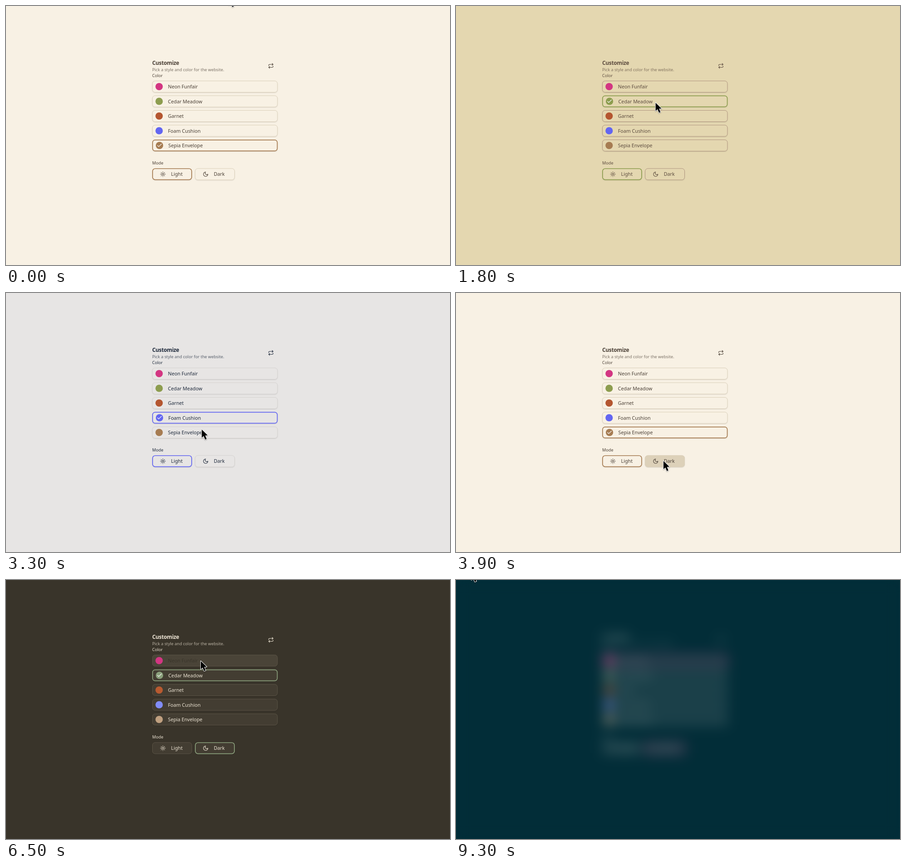
An HTML page with a canvas for the animation above (9.7 s loop, 978 px wide and 572 px high).

```html
<!DOCTYPE html>
<html lang="en">
<head>
<meta charset="utf-8">
<title>Customize</title>
<style>
html, body { margin: 0; width: 100%; height: 100%; overflow: hidden; background: #f8f1e4; }
canvas { display: block; width: 978px; height: 572px; }
</style>
</head>
<body>
<canvas id="stage" width="978" height="572"></canvas>
<script>
const canvas = document.getElementById('stage');
const ctx = canvas.getContext('2d');
const LOOP = 9700, STEP = 100, CLOSE = 7900;
const FONT = '"Noto Sans", "Open Sans", sans-serif';

const rgb = hex => [1, 3, 5].map(i => parseInt(hex.slice(i, i + 2), 16));
const css = c => `rgb(${c.map(Math.round)})`;
const mix = (a, b, k) => a.map((v, i) => v + (b[i] - v) * k);
const luma = c => 0.3 * c[0] + 0.59 * c[1] + 0.11 * c[2];

// A few base colours give the whole palette of a theme
function palette(dark, ...hexes) {
  const [bg, fg, border, accent, primary] = hexes.map(rgb);
  const [deep, pale] = dark ? [bg, fg] : [fg, bg];
  return {
    bg, fg, border, primary,
    muted: mix(fg, bg, 0.28),
    fill: dark ? mix(bg, border, 0.3) : bg,
    over: dark ? mix(bg, border, 0.5) : accent,
    overText: luma(accent) > 128 ? deep : pale
  };
}
const light = (...c) => palette(false, ...c);
const dark = (...c) => palette(true, ...c);

// background, text, border, accent, primary
const THEMES = [
  { name: 'Neon Funfair',
    Light: light('#fdf4e0', '#073642', '#839496', '#c94e20', '#d33682'),
    Dark: dark('#022d38', '#93a1a1', '#586e75', '#cb4b16', '#d33682') },
  { name: 'Cedar Meadow',
    Light: light('#e4d7b0', '#5c4b3e', '#b19681', '#dbc894', '#8d9d4f'),
    Dark: dark('#39342a', '#ede4d4', '#5a5345', '#a18f5c', '#8a9f7b') },
  { name: 'Garnet',
    Light: light('#f4f2ea', '#3d3929', '#d8d5cc', '#e1dac8', '#b45630'),
    Dark: dark('#262624', '#c3c0b6', '#3e3e38', '#1a1915', '#b85a30') },
  { name: 'Foam Cushion',
    Light: light('#e7e5e4', '#1e293b', '#d6d3d1', '#f3e5f5', '#6366f1'),
    Dark: dark('#1e1b18', '#e2e8f0', '#3a3633', '#484441', '#818cf8') },
  { name: 'Sepia Envelope',
    Light: light('#f8f1e4', '#4a3f35', '#dbd0ba', '#d7cbb0', '#a67c52'),
    Dark: dark('#2a2522', '#ece5d8', '#4a4039', '#59493e', '#c0a080') }
];

// Where the pointer arrives and what it clicks there
const stop = (at, x, y, click) => ({ at, x, y, click });
const STOPS = [
  stop(0, 491, -20, 4),
  stop(1000, 442, 178, 0),
  stop(1350, 442, 209),
  stop(1700, 440, 212, 1),
  stop(2100, 434, 244, 2),
  stop(2400, 431, 303),
  stop(2500, 429, 281),
  stop(2700, 428, 276, 3),
  stop(3400, 432, 308, 4),
  stop(3850, 457, 371),
  stop(4000, 457, 371, 'Dark'),
  stop(4600, 420, 275),
  stop(5000, 420, 275, 3),
  stop(5300, 424, 244, 2),
  stop(5800, 425, 223, 1),
  stop(5900, 422, 209),
  stop(6400, 429, 179),
  stop(6800, 429, 179, 0),
  stop(7100, 429, 179),
  stop(7600, 148, 112),
  stop(9300, 34, -18)
];

// Longer ways take longer; the pointer rests before it leaves
function pointer(t) {
  const i = STOPS.findIndex(s => s.at > t);
  if (i < 1) {
    const s = STOPS[i < 0 ? STOPS.length - 1 : 0];
    return [s.x, s.y];
  }
  const a = STOPS[i - 1], b = STOPS[i];
  const time = Math.min(b.at - a.at, 250 + 3 * Math.hypot(b.x - a.x, b.y - a.y));
  const k = Math.max(0, 1 - (b.at - t) / time);
  return mix([a.x, a.y], [b.x, b.y], k * k * (3 - 2 * k));
}

// How far the hover fade of a box has come
function hover(t, x, y, w, h) {
  let sum = 0;
  for (let d = 60; d < 210; d += 25) {
    const [px, py] = pointer(t - d);
    if (px >= x && px <= x + w && py >= y && py <= y + h) sum++;
  }
  return sum / 6;
}

// Replays the clicks made so far
function state(t) {
  let pick = 4, mode = 'Light', colors = THEMES[pick][mode];
  for (const { at, click } of STOPS) {
    if (at > t) break;
    if (click === undefined) continue;
    if (typeof click === 'string') mode = click;
    else pick = click;
    const before = colors;
    colors = { ...THEMES[pick][mode] };
    if (at > 0 && t - at < STEP) {
      for (const key in colors) colors[key] = mix(before[key], colors[key], 0.5);
    }
  }
  return { pick, mode, ...colors };
}

function text(str, x, y, size, color, weight = 400, spacing = 0) {
  ctx.font = `${weight} ${size}px ${FONT}`;
  ctx.letterSpacing = spacing + 'px';
  ctx.fillStyle = css(color);
  ctx.fillText(str, x, y);
}

function icon(path, cx, cy, color) {
  ctx.save();
  ctx.translate(cx - 6.5, cy - 6.5);
  ctx.scale(13 / 24, 13 / 24);
  ctx.lineWidth = 2;
  ctx.lineCap = ctx.lineJoin = 'round';
  ctx.strokeStyle = color;
  ctx.stroke(new Path2D(path));
  ctx.restore();
}
const SWAP = 'm17 2 4 4-4 4M3 11v-1a4 4 0 0 1 4-4h14M7 22l-4-4 4-4M21 13v1a4 4 0 0 1-4 4H3';
const MOON = 'M12 3a6 6 0 0 0 9 9 9 9 0 1 1-9-9Z';
const CHECK = 'M20 6 9 17l-5-5';
let SUN = 'M16 12a4 4 0 1 1-8 0a4 4 0 1 1 8 0';
for (let a = 0; a < 8; a++) {
  const c = Math.cos(a * Math.PI / 4), s = Math.sin(a * Math.PI / 4);
  SUN += `M${12 + 8 * c} ${12 + 8 * s}L${12 + 10 * c} ${12 + 10 * s}`;
}

function box(x, y, w, h, inset) {
  ctx.beginPath();
  ctx.roundRect(x + inset, y + inset, w - 2 * inset, h - 2 * inset, 6.5 - inset);
}

// Draws the frame of a button and returns its text colour
function button(s, t, x, y, w, selected) {
  const h = 26, k = selected ? 0 : hover(t, x, y, w, h);
  const line = selected ? 1.7 : 1;
  ctx.save();
  ctx.shadowColor = 'rgba(0,0,0,.12)';
  ctx.shadowBlur = 2;
  ctx.shadowOffsetY = 1;
  box(x, y, w, h, 0);
  ctx.fillStyle = css(mix(s.fill, s.over, k));
  ctx.fill();
  ctx.restore();
  box(x, y, w, h, line / 2);
  ctx.lineWidth = line;
  ctx.strokeStyle = css(selected ? s.primary : s.border);
  ctx.stroke();
  return mix(s.fg, s.overText, k);
}

function card(s, t) {
  text('Customize', 322, 129.5, 11.9, s.fg, 600, -0.3);
  text('Pick a style and color for the website.', 322, 143.7, 9.15, s.muted);
  text('Color', 322, 157, 9.15, s.fg);
  icon(SWAP, 583.5, 132.2, css(s.fg));

  THEMES.forEach((theme, i) => {
    const y = 165 + 32.5 * i, cy = y + 13, on = i === s.pick, shift = on ? 0.8 : 0;
    const color = button(s, t, 322, y, 276.4, on);
    ctx.beginPath();
    ctx.arc(337.3 + shift, cy, 8.1, 0, 7);
    ctx.fillStyle = css(theme[s.mode].primary);
    ctx.fill();
    if (on) icon(CHECK, 338.1, cy, '#fff');
    text(theme.name, 356.8 + shift, cy + 4, 10.69, color);
  });

  text('Mode', 322, 350.3, 9.15, s.fg);
  [['Light', SUN], ['Dark', MOON]].forEach(([label, shape], i) => {
    const x = 322 + 94.2 * i;
    const color = button(s, t, x, 358.4, 87.8, label === s.mode);
    icon(shape, x + 23.6, 371.4, css(color));
    text(label, x + 41.6, 375.3, 10.69, color);
  });
}

// The closing panel dissolves into a soft trace
function dissolve(amount) {
  ctx.save();
  ctx.globalAlpha = amount;
  ctx.filter = 'blur(14px)';
  ctx.drawImage(canvas, 0, 0);
  ctx.restore();
}

function cursor(x, y) {
  ctx.save();
  ctx.translate(x, y);
  const p = new Path2D('M0 0V18L4.2 14.4 7.5 22.2 10.8 20.8 7.6 13.2 13 12.8Z');
  ctx.lineJoin = 'round';
  ctx.lineWidth = 2;
  ctx.strokeStyle = '#fff';
  ctx.shadowColor = 'rgba(0,0,0,.35)';
  ctx.shadowBlur = 2;
  ctx.shadowOffsetY = 1;
  ctx.stroke(p);
  ctx.shadowColor = 'transparent';
  ctx.fillStyle = '#000';
  ctx.fill(p);
  ctx.restore();
}

function draw(now) {
  const t = Math.floor((now % LOOP) / STEP) * STEP;
  const s = state(t);
  ctx.fillStyle = css(s.bg);
  ctx.fillRect(0, 0, canvas.width, canvas.height);
  card(s, t);
  if (t >= CLOSE) dissolve(t > CLOSE ? 1 : 0.6);
  cursor(...pointer(t));
}

const start = performance.now();
(function tick() {
  draw(performance.now() - start);
  requestAnimationFrame(tick);
})();
</script>
</body>
</html>
```
